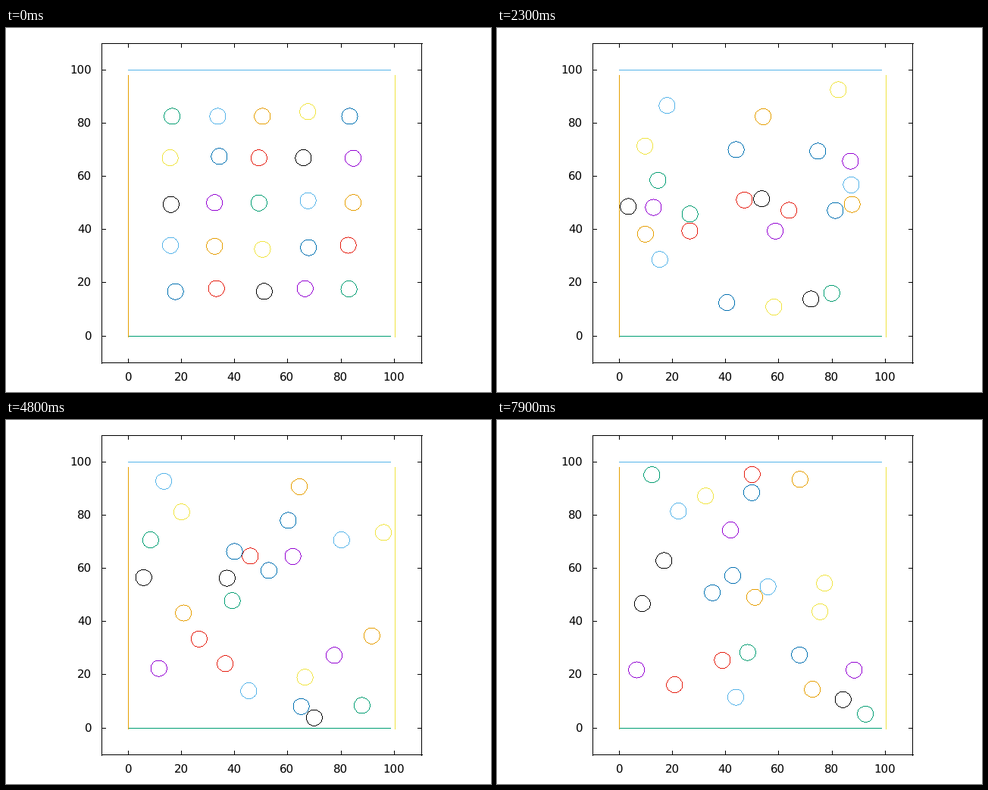
A matplotlib script that plays this animation: 640 px wide and 480 px high, repeating every 8 s.

```python
import numpy as np
import matplotlib.pyplot as plt
from matplotlib.animation import FuncAnimation

W, H, DPI = 640, 480, 100
FRAMES, STEP = 80, 100
PX = 72 / DPI
SIZE, R, SIDE = 100, 3.0, 5
SUBSTEPS = 50
PALETTE = ["#9400d3", "#009e73", "#56b4e9", "#e69f00",
           "#f0e442", "#0072b2", "#e51e10", "#000000"]

# Launch directions in degrees, left to right, bottom row first
ANGLES = [-10.3, 106.7, -5.5, 109.9, 124,
          148.5, 168.6, -70.6, -18.1, 145.2,
          230, 185.5, 191.4, 40.2, -2.4,
          173.4, 39.5, 174, 173.3, -2.8,
          256, -78, -73.5, 49.8, 253.4]

plt.rcParams["text.hinting"] = "no_hinting"
fig = plt.figure(figsize=(W / DPI, H / DPI), dpi=DPI, facecolor="white")
ax = fig.add_axes([0, 0, 1, 1])
ax.set_xlim(0, W)
ax.set_ylim(H, 0)
ax.axis("off")


def to_px(x, y):
    return 161 + 3.516 * x, 406 - 3.51 * y


def line(x0, y0, x1, y1, color="black"):
    ax.plot([x0, x1], [y0, y1], color=color, lw=PX, antialiased=False,
            solid_capstyle="butt")


def draw_axes():
    left, right, top, bottom = 126, 548, 20, 441
    for x in (left, right):
        line(x, top, x, bottom + 1)
    for y in (top, bottom):
        line(left, y, right + 1, y)
    font = dict(family="DejaVu Sans", size=15 * PX, va="baseline")
    for v in range(0, SIZE + 1, 20):
        x, y = (int(c) for c in to_px(v, v))
        line(x, bottom, x, bottom - 5)
        line(x, top, x, top + 5)
        line(left, y, left + 5, y)
        line(right, y, right - 5, y)
        ax.text(x, 465, str(v), ha="center", **font)
        ax.text(113, y + 5, str(v), ha="right", **font)


def draw_walls():
    line(161, 406, 507, 406, PALETTE[1])
    line(161, 55, 507, 55, PALETTE[2])
    line(161, 62, 161, 407, PALETTE[3])
    line(513, 62, 513, 407, PALETTE[4])


def collide(pos, vel):
    """Elastic hits between equal discs: swap speed along the contact line."""
    gap = pos[:, None] - pos[None]
    close = np.triu((gap ** 2).sum(-1) < (2 * R) ** 2, 1)
    for i, j in np.argwhere(close):
        normal = gap[i, j] / np.hypot(*gap[i, j])
        push = (vel[i] - vel[j]) @ normal
        if push < 0:
            vel[i] -= push * normal
            vel[j] += push * normal


def simulate():
    grid = np.arange(1, SIDE + 1) * SIZE / (SIDE + 1)
    pos = np.array([(x, y) for y in grid for x in grid])
    a = np.radians(ANGLES)
    vel = np.column_stack([np.cos(a), np.sin(a)])
    track = []
    for _ in range(FRAMES):
        for _ in range(SUBSTEPS):
            pos += vel / SUBSTEPS
            collide(pos, vel)
            vel = np.where(pos < R, abs(vel), vel)
            vel = np.where(pos > SIZE - R, -abs(vel), vel)
        track.append(pos.copy())
    return track


def pixel_ring(radius):
    """One-pixel outline: scan columns for the caps, rows for the sides."""
    reach = int(radius / np.sqrt(2))
    k = np.arange(-reach, reach + 1)
    e = np.sqrt(radius ** 2 - k ** 2)
    return np.concatenate([k, k, e, -e]), np.concatenate([e, -e, k, k])


draw_axes()
draw_walls()
track = simulate()
ring_x, ring_y = pixel_ring(3.513 * R)
discs = [ax.plot([], [], ",", color=PALETTE[(i + 5) % len(PALETTE)])[0]
         for i in range(SIDE ** 2)]


def update(n):
    for disc, (x, y) in zip(discs, track[n]):
        cx, cy = to_px(x, y)
        disc.set_data(np.rint(cx + ring_x), np.rint(cy + ring_y))
    return discs


anim = FuncAnimation(fig, update, frames=FRAMES, interval=STEP,
                     repeat=True, repeat_delay=0, blit=False)
plt.show()
```
